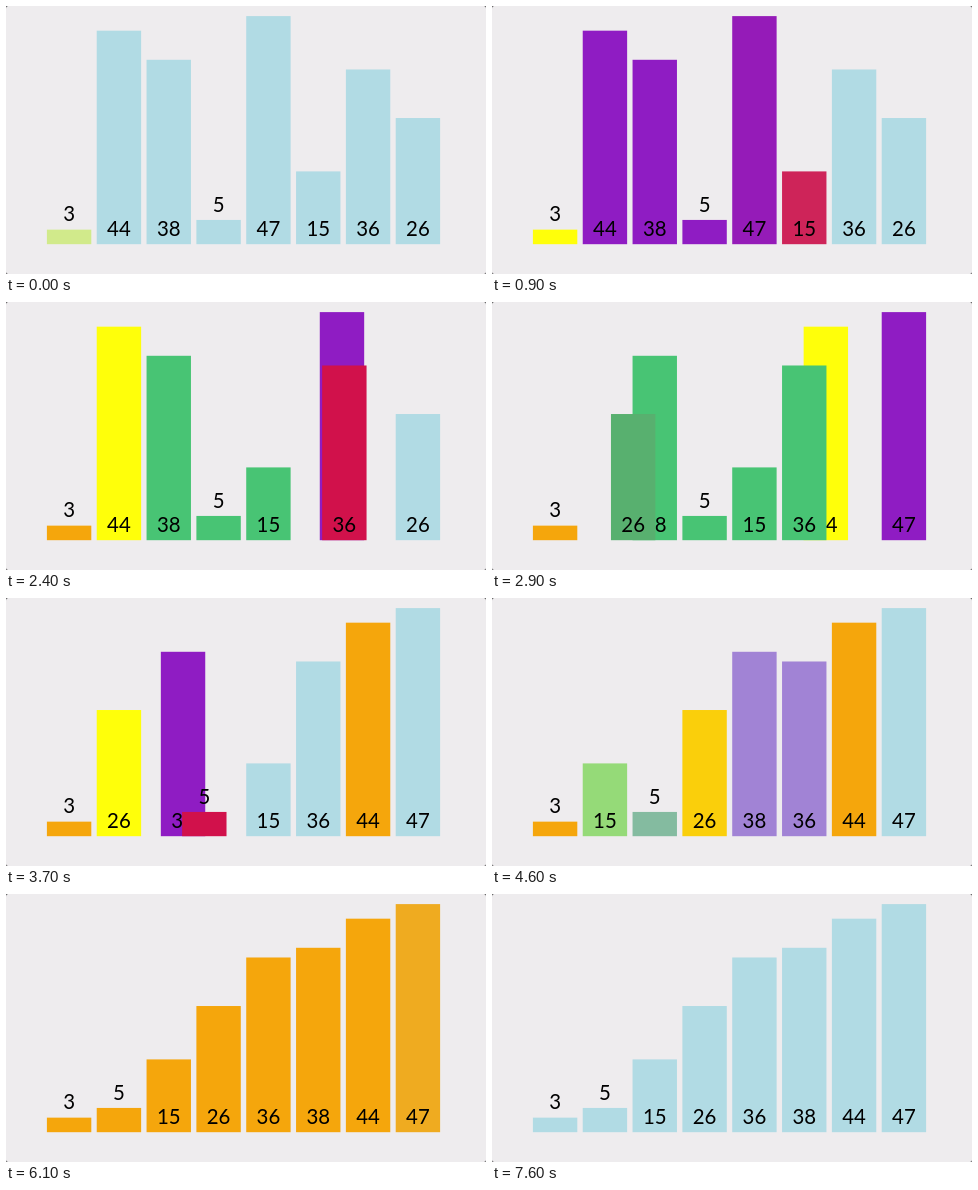
An HTML page for the animation above (7700 ms loop, 480x268 px).

```html
<!DOCTYPE html>
<html lang="en">
<head>
<meta charset="utf-8">
<title>Quicksort</title>
<style>
  html, body { margin: 0; width: 100%; height: 100%; overflow: hidden; background: #555; }
  svg { display: block; width: 100vw; height: 100vh; }
  text { font: 20.4px Lato, "Open Sans", sans-serif; text-anchor: middle; fill: #000; }
</style>
</head>
<body>
<svg id="stage" viewBox="0 0 480 268">
  <rect width="480" height="268" rx="2.5" fill="#eeecee"/>
</svg>
<script>
const LOOP = 7700, FADE = 150;
const BASE = 238.2, UNIT = 4.853, LEFT = 40.9, PITCH = 49.83, WIDTH = 44.4;
const BLUE = [177, 219, 228], YELLOW = [255, 255, 10], RED = [209, 17, 75],
      GREEN = [72, 196, 116], PURPLE = [143, 28, 195], ORANGE = [245, 166, 12];
const values = [3, 44, 38, 5, 47, 15, 36, 26];

// Pacing: [step, start time in ms]; steps between are evenly spaced.
const pace = [[0, -60], [5, 765], [11, 1678], [12, 1707], [13, 1745], [20, 2768],
              [29, 4370], [30, 4520], [31, 4562], [32, 4585], [41, 5965], [42, 6230]];

function startOf(step) {
  let i = 1;
  while (i < pace.length - 1 && pace[i][0] < step) i++;
  const [s0, t0] = pace[i - 1], [s1, t1] = pace[i];
  return t0 + (t1 - t0) * (step - s0) / (s1 - s0);
}

// Run the sort once and record every step; bars are known by their first index.
function record() {
  const order = values.map((_, i) => i);
  const colors = values.map(() => BLUE);
  const done = new Set();
  const steps = [];

  const push = () => steps.push({
    slots: values.map((_, i) => order.indexOf(i)),
    colors: colors.slice()
  });
  const swap = (a, b) => { [order[a], order[b]] = [order[b], order[a]]; };
  const finish = slot => {
    done.add(order[slot]);
    values.forEach((_, i) => { colors[i] = done.has(i) ? ORANGE : BLUE; });
    push();
  };

  function sort(lo, hi) {
    if (lo > hi) return;
    if (lo === hi) return finish(lo);
    const pivot = order[lo];
    let mid = lo;
    colors[pivot] = YELLOW;
    push();
    for (let k = lo + 1; k <= hi; k++) {
      const bar = order[k];
      colors[bar] = RED;
      push();
      if (values[bar] < values[pivot]) {
        if (++mid !== k) {
          swap(mid, k);
          push();
        }
        colors[bar] = GREEN;
      } else {
        colors[bar] = PURPLE;
      }
    }
    swap(lo, mid);
    push();
    finish(mid);
    sort(lo, mid - 1);
    sort(mid + 1, hi);
  }

  sort(0, values.length - 1);
  colors.fill(BLUE);
  push();
  return steps.map((s, i) => ({ ...s, time: startOf(i) }));
}

const steps = record();
const rest = { slots: values.map((_, i) => i), colors: values.map(() => BLUE) };

function make(tag, attrs, parent) {
  const el = document.createElementNS("http://www.w3.org/2000/svg", tag);
  for (const key in attrs) el.setAttribute(key, attrs[key]);
  return parent.appendChild(el);
}

const bars = values.map(v => {
  const group = make("g", {}, document.getElementById("stage"));
  const top = BASE - v * UNIT;
  const rect = make("rect", { y: top, width: WIDTH, height: v * UNIT }, group);
  const label = make("text", { x: WIDTH / 2, y: v < 10 ? top - 8.4 : 229.6 }, group);
  label.textContent = v;
  return { group, rect };
});

const progress = (step, t) => Math.max(0, Math.min(1, (t - step.time) / FADE));

// Each step adds its change linearly, so close steps blend into each other.
function draw(t) {
  bars.forEach(({ group, rect }, i) => {
    let slot = rest.slots[i];
    const color = rest.colors[i].slice();
    let prev = rest;
    for (const step of steps) {
      const p = progress(step, t);
      if (p === 0) break;
      slot += (step.slots[i] - prev.slots[i]) * p;
      for (let c = 0; c < 3; c++) color[c] += (step.colors[i][c] - prev.colors[i][c]) * p;
      prev = step;
    }
    group.setAttribute("transform", `translate(${(LEFT + PITCH * slot).toFixed(2)} 0)`);
    rect.setAttribute("fill", `rgb(${color.map(Math.round).join(",")})`);
  });
}

const begin = performance.now();
function tick() {
  draw((performance.now() - begin) % LOOP);
  requestAnimationFrame(tick);
}
tick();
</script>
</body>
</html>
```
